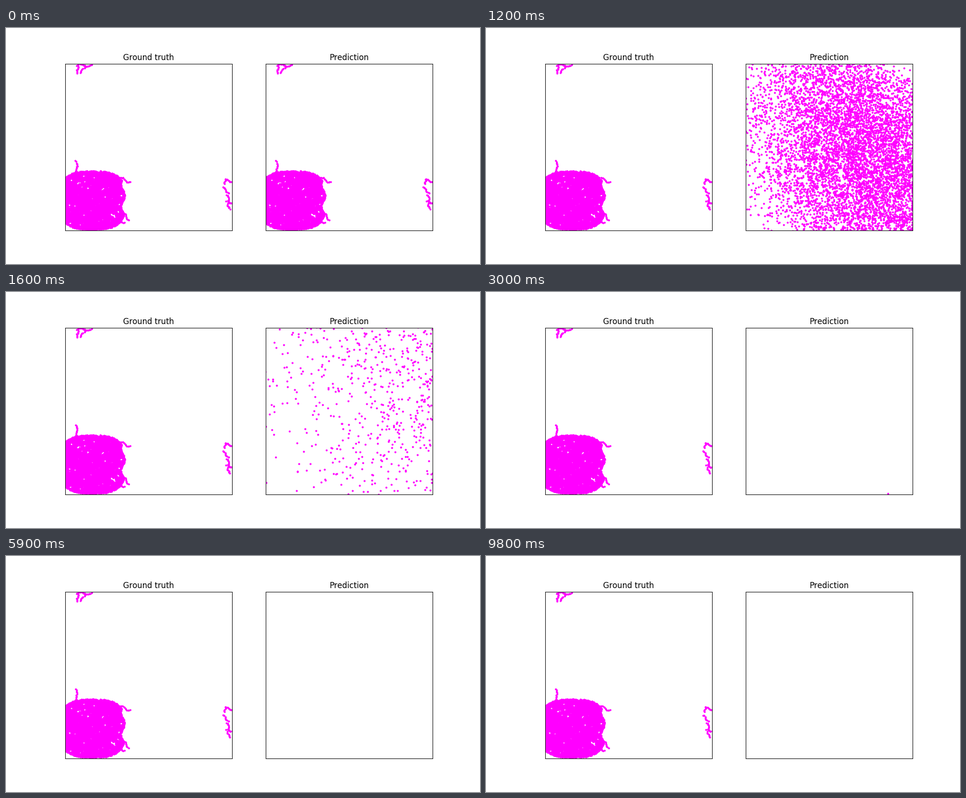
These frames come from a looping animation (1000 px wide and 500 px high, 9900 ms). A matplotlib script:

```python
import numpy as np
import matplotlib.pyplot as plt
from matplotlib.animation import FuncAnimation

FRAMES, INTERVAL = 99, 100
SIDE = 775 / 2.2
LEFT, MIDDLE = 125, 252.5
CENTRE = np.array([182, 365])
rng = np.random.default_rng(7)

# Strands of particles, each from one end (x, y) to the other, in stage pixels
TOP = [(149, 80, 180, 78), (151, 80, 151, 96), (166, 81, 157, 95)]
ARMS = [(146, 282, 151, 314), (240, 318, 262, 326),
        (248, 392, 259, 407), (236, 408, 250, 412)]
RIGHT = [(463, 320, 461, 330), (463, 321, 476, 326), (457, 337, 470, 350),
         (465, 353, 473, 384), (465, 367, 476, 371)]


def strand(x0, y0, x1, y1, gap=2.2):
    dx, dy = x1 - x0, y1 - y0
    s = np.linspace(0, 1, int(np.hypot(dx, dy) / gap) + 2)
    bend = 0.1 * np.sin(2 * np.pi * s)
    line = np.column_stack([x0 + dx * s + dy * bend, y0 + dy * s - dx * bend])
    return line + rng.normal(0, 0.4, line.shape)


def strands(ends):
    return np.vstack([strand(*end) for end in ends])


def blob(count, holes=45):
    """Fill a rounded square with a wavy right side, leaving small holes."""
    low, high = (LEFT, 302), (255, 428)
    points = rng.uniform(low, high, (count, 2))
    x, y = points.T
    rounded = (np.abs((points - CENTRE) / (70, 62)) ** 3).sum(axis=1) < 1
    points = points[rounded & (x < 247 + 4 * np.cos((y - 355) / 7.5))]
    centres = rng.uniform(low, high, (holes, 2))
    radii = rng.uniform(1.8, 3.3, holes)
    gaps = np.linalg.norm(points[:, None] - centres, axis=2)
    return points[(gaps > radii).all(axis=1)]


def fan(count):
    """Velocities thrown up and to the right in a wide fan."""
    speed = 160 * rng.uniform(0, 1, count) ** 0.42
    angle = np.radians(rng.normal(25, 38, count))
    return np.column_stack([speed * np.cos(angle), -speed * np.sin(angle)])


body = np.vstack([blob(12000), strands(ARMS)])
top, right = strands(TOP), strands(RIGHT)
rest = np.vstack([body, top, right])

velocity = np.vstack([fan(len(body)) + rng.normal(0, 18, body.shape),
                      rng.normal((35, 2), (42, 26), top.shape),
                      rng.normal((45, 0), 36, right.shape)])
settle = rng.normal(0, 0.3, rest.shape)
settle[:len(body)] -= 0.006 * (body - CENTRE)

plt.rcParams["text.kerning_factor"] = 6
fig, axes = plt.subplots(1, 2, figsize=(10, 5), dpi=100)
dots = []
for ax, title in zip(axes, ("Ground truth", "Prediction")):
    ax.set_title(title)
    ax.set_xlim(LEFT, LEFT + SIDE)
    ax.set_ylim(MIDDLE + SIDE / 2, MIDDLE - SIDE / 2)
    ax.set_xticks([])
    ax.set_yticks([])
    ax.set_aspect(1)
    dots += ax.plot([], [], "o", ms=2, color="magenta")


def update(frame):
    t = frame * INTERVAL / 1000
    truth = rest + settle * (1 - np.exp(-t / 2))
    flung = truth + velocity * t ** 4
    offset = np.abs(flung - (LEFT + SIDE / 2, MIDDLE))
    dots[0].set_data(*truth.T)
    dots[1].set_data(*flung[(offset < SIDE / 2 + 4).all(axis=1)].T)
    return dots


anim = FuncAnimation(fig, update, frames=FRAMES, interval=INTERVAL,
                     repeat=True, repeat_delay=0, blit=False)
plt.show()
```
